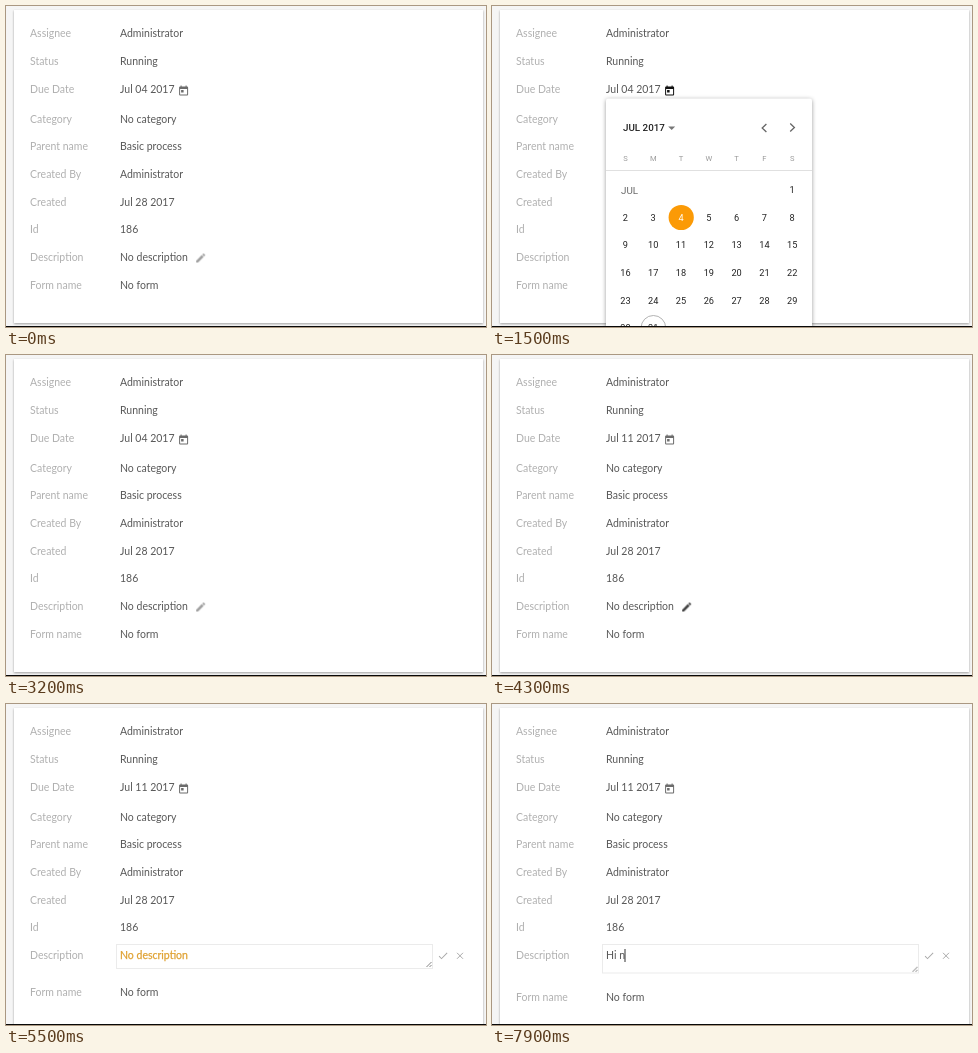
An HTML page that plays this animation: 480x321 px, repeating every 8000 ms.

```html
<!DOCTYPE html>
<html lang="en">
<head>
<meta charset="utf-8">
<title>Task details</title>
<style>
html, body { margin: 0; width: 100%; height: 100%; overflow: hidden; background: #f5f5f5; }
svg { display: block; width: 480px; height: 321px; }
text { font: 10.5px Lato, sans-serif; fill: #585858; }
.label { fill: #b0b0b0; }
.picker text { font: 9.2px Roboto, sans-serif; fill: #222; text-anchor: middle; }
.picker .weekday { font-size: 7.6px; fill: #999; }
.picker .month { font-size: 9.8px; fill: #666; text-anchor: start; }
.picker .title { font-size: 9.8px; font-weight: 500; text-anchor: start; }
.picker .chosen { fill: #fff; }
.panel { filter: drop-shadow(0 1px 2px rgba(0, 0, 0, .4)); }

.anim { animation: 8s step-end infinite; }
.card { filter: drop-shadow(0 1.3px .8px rgba(0, 0, 0, .35)); animation-name: grow; }
.event { animation-name: event; }
.picker { animation-name: picker; }
.hover { animation-name: hover; }
.old { animation-name: old; }
.new { animation-name: new; }
.pencil { animation-name: pencil; }
.idle { animation-name: idle; }
.edit { animation-name: edit; }
.hint { animation-name: hint; }
.box { animation-name: box; }
.grip { animation-name: grip; }
.form { animation-name: form; }
.caret { animation-name: caret; }
.key1 { animation-name: key1; }
.key2 { animation-name: key2; }
.key3 { animation-name: key3; }

@keyframes grow { 0% { height: 313px } 58.75%, 100% { height: 330px } }
@keyframes event {
  0% { fill: #6c6c6c } 13.75% { fill: #111 } 21.25% { fill: #303030 }
  22.5% { fill: #4e4e4e } 23.75%, 100% { fill: #6c6c6c }
}
@keyframes picker { 0% { visibility: hidden } 18.75% { visibility: visible } 40%, 100% { visibility: hidden } }
@keyframes hover { 0% { opacity: 0 } 27.5%, 100% { opacity: 1 } }
@keyframes old { 0% { opacity: 1 } 43.75%, 100% { opacity: 0 } }
@keyframes new { 0% { opacity: 0 } 43.75%, 100% { opacity: 1 } }
@keyframes pencil { 0% { fill: #a0a0a0; opacity: 1 } 53.75% { fill: #444; opacity: 1 } 58.75%, 100% { opacity: 0 } }
@keyframes idle { 0% { opacity: 1 } 58.75%, 100% { opacity: 0 } }
@keyframes edit { 0% { opacity: 0 } 58.75%, 100% { opacity: 1 } }
@keyframes hint {
  0% { fill: #b8b8b8; opacity: 0 } 58.75% { fill: #b8b8b8; opacity: 1 }
  60% { fill: #c2ae88; opacity: 1 } 61.25% { fill: #d1a75c; opacity: 1 }
  62.5% { fill: #dfa131; stroke: #dfa131; opacity: 1 } 83.75%, 100% { opacity: 0 }
}
@keyframes box {
  0% { opacity: 0; height: 22px } 60% { opacity: .35; height: 22px }
  61.25% { opacity: .7; height: 23px } 62.5% { opacity: 1; height: 24px }
  83.75%, 100% { opacity: 1; height: 28.5px }
}
@keyframes grip {
  0% { transform: translate(-3.5px, -1.5px) } 60% { transform: translate(-2px, -1px) }
  61.25% { transform: translate(-1px, -.5px) } 62.5% { transform: none }
  83.75%, 100% { transform: translateY(4.8px) }
}
@keyframes form {
  0% { transform: none } 58.75% { transform: translateY(3.5px) }
  60% { transform: translateY(5.5px) } 61.25% { transform: translateY(7.5px) }
  62.5% { transform: translateY(9.5px) } 83.75%, 100% { transform: translateY(14.5px) }
}
@keyframes caret {
  0% { opacity: 0 } 60% { opacity: 1 } 65% { opacity: 0 } 71.25% { opacity: 1 }
  77.5% { opacity: 0 } 83.75% { opacity: 1; transform: translateX(7.5px) }
  86.25% { opacity: 1; transform: translateX(10px) }
  88.75% { opacity: 1; transform: translateX(12px) } 95% { opacity: 0 }
  98.75%, 100% { opacity: 1; transform: translateX(18px) }
}
@keyframes key1 { 0% { visibility: hidden } 83.75%, 100% { visibility: visible } }
@keyframes key2 { 0% { visibility: hidden } 86.25%, 100% { visibility: visible } }
@keyframes key3 { 0% { visibility: hidden } 98.75%, 100% { visibility: visible } }
</style>
</head>
<body>
<svg viewBox="0 0 480 321">
  <rect width="480" height="321" fill="#f5f5f5"/>
  <rect class="card anim" x="8" y="4" width="469" height="313" fill="#fff"/>
  <g id="rows"></g>

  <text class="old anim" x="114" y="87.2">Jul 04 2017</text>
  <text class="new anim" x="114" y="87.2">Jul 11 2017</text>
  <path class="event anim" transform="translate(171.6 78.9) scale(.5)" d="M19 3h-1V1h-2v2H8V1H6v2H5a2 2 0 0 0-2 2v14a2 2 0 0 0 2 2h14a2 2 0 0 0 2-2V5a2 2 0 0 0-2-2zM19 19H5V8h14zM7 10h5v5H7z" fill-rule="evenodd"/>

  <text class="idle anim" x="114" y="255">No description</text>
  <path class="pencil anim" transform="translate(188.7 246) scale(.5)" d="M3 17.25V21h3.75L17.8 9.94l-3.75-3.75zM20.7 7a1 1 0 0 0 0-1.4l-2.3-2.3a1 1 0 0 0-1.4 0l-1.9 1.8 3.75 3.75z"/>

  <g class="edit anim">
    <rect class="box anim" x="110.5" y="240.5" width="316" height="24" fill="#fff" stroke="#ebebeb"/>
    <path class="grip anim" d="M420.5 263l5-5M423.5 263l2-2" stroke="#777" stroke-width=".9"/>
    <path transform="translate(431 245.8) scale(.5)" fill="#aaa" d="M9 16.2L4.8 12l-1.4 1.4L9 19 21 7l-1.4-1.4z"/>
    <path d="M451 248.8l6 6m0-6l-6 6" stroke="#aaa"/>
    <text class="hint anim" x="114" y="255" stroke-width=".25">No description</text>
    <text x="114" y="255"><tspan class="key1 anim">H</tspan><tspan class="key2 anim">i</tspan><tspan class="key3 anim"> n</tspan></text>
    <rect class="caret anim" x="114.5" y="245" width="1" height="13" fill="#333"/>
  </g>

  <g class="picker anim">
    <rect class="panel" x="114" y="92.5" width="206" height="240" rx="2" fill="#fff"/>
    <text class="title" x="131" y="125">JUL 2017</text>
    <path d="M176.2 120.5h7l-3.5 3.6z" fill="#777"/>
    <path d="M274.4 118l-4.2 4 4.2 4M298.2 117.5l4.2 4-4.2 4" fill="none" stroke="#666" stroke-width="1.3"/>
    <path d="M114 164.5h206" stroke="#e0e0e0"/>
    <text class="month" x="129" y="187.5">JUL</text>
    <circle cx="189.2" cy="211.5" r="12.6" fill="#fb9a06"/>
    <circle class="hover anim" cx="189.2" cy="239" r="12" fill="#f1f1f1"/>
    <circle cx="161.4" cy="321.8" r="12.3" fill="none" stroke="#aaa" stroke-width=".9"/>
    <g id="days"></g>
  </g>
  <rect y="320" width="480" height="1" fill="#080808"/>
</svg>
<script>
const rows = document.getElementById('rows');
const days = document.getElementById('days');

function addText(parent, x, y, str, cls = '') {
  const el = document.createElementNS('http://www.w3.org/2000/svg', 'text');
  el.setAttribute('x', x);
  el.setAttribute('y', y);
  el.setAttribute('class', cls);
  el.textContent = str;
  parent.append(el);
}

const fields = [
  [31.4, 'Assignee', 'Administrator'],
  [59, 'Status', 'Running'],
  [86.6, 'Due Date', ''],
  [116.7, 'Category', 'No category'],
  [144.3, 'Parent name', 'Basic process'],
  [171.9, 'Created By', 'Administrator'],
  [199.5, 'Created', 'Jul 28 2017'],
  [227.1, 'Id', '186'],
  [254.7, 'Description', ''],
  [282.7, 'Form name', 'No form'],
];
for (const [y, label, value] of fields) {
  const move = label === 'Form name' ? 'form anim' : '';
  addText(rows, 24, y, label, 'label ' + move);
  addText(rows, 114, y, value, move);
}

// Month grid: the 1st falls on a Saturday
const colX = c => 133.4 + c * 27.8;
[...'SMTWTFS'].forEach((d, c) => addText(days, colX(c), 154.8, d, 'weekday'));
for (let day = 1; day <= 31; day++) {
  const cell = day + 5;
  addText(days, colX(cell % 7), 187.3 + Math.floor(cell / 7) * 27.55, day, day === 4 ? 'chosen' : '');
}
</script>
</body>
</html>
```
